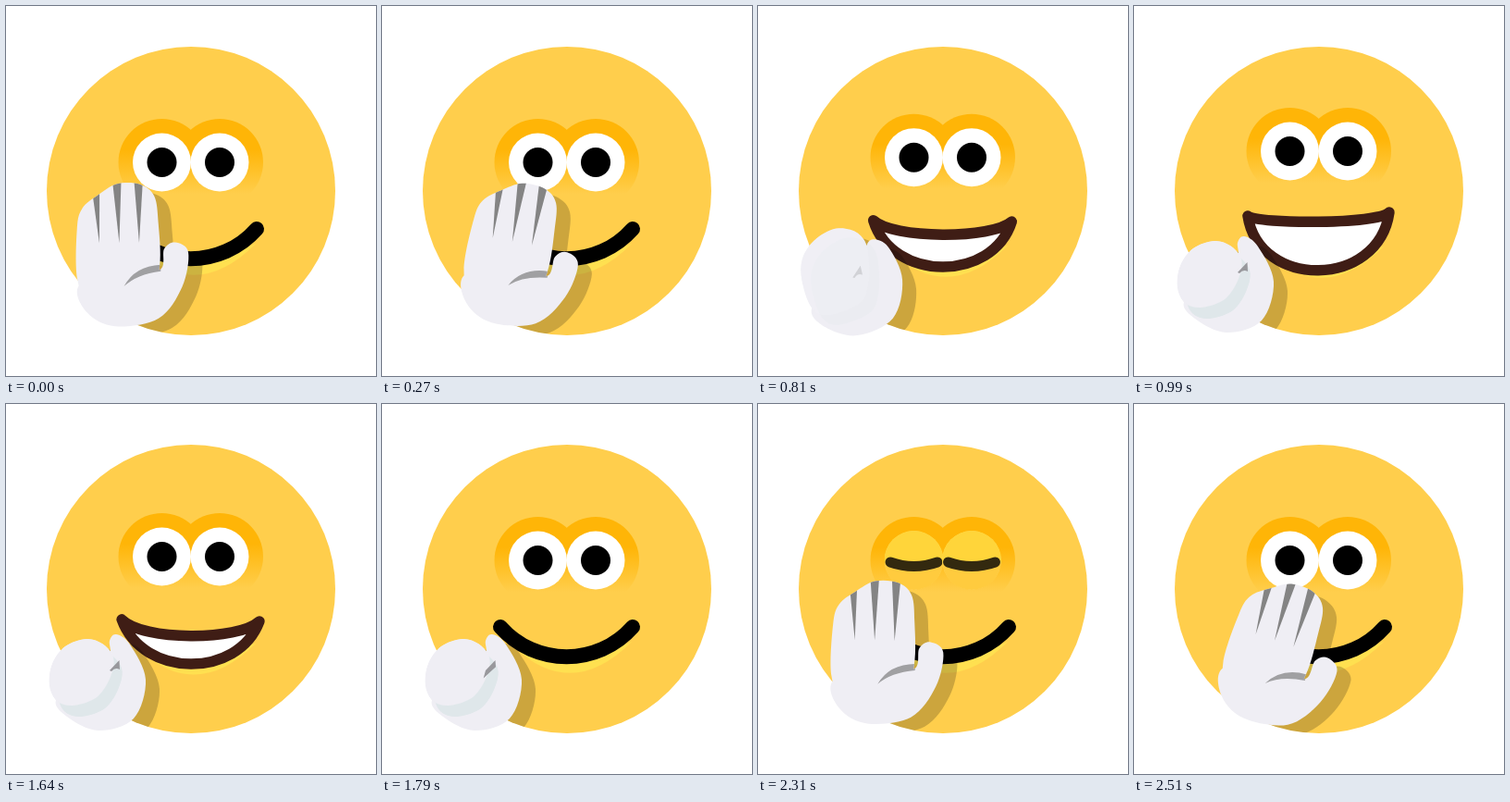
Recreate the animation shown at these times as an HTML page with a canvas. Size 400x400 px, loop 2560 ms.

```html
<!DOCTYPE html>
<html lang="en">
<head>
<meta charset="utf-8">
<title>Waving smiley</title>
<style>
html, body { margin: 0; width: 100%; height: 100%; overflow: hidden; background: #fff; }
canvas { display: block; width: 400px; height: 400px; }
</style>
</head>
<body>
<canvas id="stage" width="400" height="400"></canvas>
<script>
const g = document.getElementById('stage').getContext('2d');
const LOOP = 2560, FACE = '#ffce4c', SKIN = '#efeef4';

// Key points of the hand, joined by smooth closed curves
const FINGERS = {
  open: [[78,240], [84,218], [101,204], [122,192], [147,193], [162,206], [166,235], [167,280], [155,312], [95,320], [78,296]],
  fist: [[47,304], [50,281], [64,262], [87,254], [104,259], [115,271], [116,285], [108,305], [95,319], [72,326], [55,321]]
};
const PALM = {
  open: [[166,286], [172,263], [184,256], [198,267], [191,304], [165,338], [118,346], [88,331], [79,302], [120,280]],
  fist: [[112,272], [112,256], [119,249], [134,260], [151,298], [138,340], [100,353], [66,338], [55,318], [95,290]]
};

const mix = (a, b, p) => a + (b - a) * p;
const ease = (t, from, to) => {
  const p = Math.min(1, Math.max(0, (t - from) / (to - from)));
  return p * p * (3 - 2 * p);
};

// The motion is shown in steps of 90 or 50 ms
function step(t) {
  const snap = (start, size) => start + Math.floor((t - start) / size) * size;
  if (t < 1640) return Math.min(990, snap(0, 90));
  if (t < 1990) return snap(1640, 50);
  if (t < 2260) return snap(1990, 90);
  return snap(2260, 50);
}

function disc(x, y, r, fill) {
  g.beginPath();
  g.arc(x, y, r, 0, 7);
  g.fillStyle = fill;
  g.fill();
}

function shape(path, fill) {
  g.fillStyle = fill;
  g.fill(typeof path === 'string' ? new Path2D(path) : path);
}

// Closed Catmull-Rom curve between the two poses
function outline({ open, fist }, fold) {
  const n = open.length, path = new Path2D();
  const at = (i, k) => mix(open[(i + n) % n][k], fist[(i + n) % n][k], fold);
  const handle = (i, side, k) => at(i, k) + side * (at(i + 1, k) - at(i - 1, k)) / 6;
  path.moveTo(at(0, 0), at(0, 1));
  for (let i = 0; i < n; i++) {
    path.bezierCurveTo(handle(i, 1, 0), handle(i, 1, 1),
      handle(i + 1, -1, 0), handle(i + 1, -1, 1), at(i + 1, 0), at(i + 1, 1));
  }
  return path;
}

function drawEyes(y, shut) {
  const xs = [168.5, 231];
  const glow = g.createLinearGradient(0, y - 14, 0, y + 34);
  glow.addColorStop(0, '#ffb507');
  glow.addColorStop(1, FACE);
  for (const x of xs) disc(x, y, 47, glow);
  for (const x of xs) {
    g.save();
    g.translate(x, y);
    disc(0, 0, 31.5, '#fff');
    disc(0, 0, 16, '#000');
    const lid = mix(-32, 2, shut);
    g.save();
    g.clip(new Path2D('M-32 0 A32 32 0 0 1 32 0 A32 32 0 0 1 -32 0'));
    g.fillStyle = '#ffd53a';
    g.fillRect(-32, -32, 64, lid + 32);
    g.fillStyle = '#ffcb3e';
    g.fillRect(-32, mix(32, 2, shut), 64, 30 * shut);
    g.restore();
    if (shut > 0.5) {
      g.strokeStyle = '#33290f';
      g.lineWidth = 11;
      g.stroke(new Path2D(`M-25.5 ${lid} Q0 ${lid + 9} 25.5 ${lid}`));
    }
    g.restore();
  }
}

// A smile at joy 0, wide open at joy 1
function drawMouth(joy) {
  const dark = Math.min(1, 2 * joy), drop = 3 * joy;
  const left = [mix(128, 123, joy), mix(241, 227, joy)];
  const right = [mix(271, 276, joy), mix(241, 223, joy * joy)];
  const inset = mix(38, 12, joy);
  const curve = (a, b, y) => {
    const side = Math.sign(b[0] - a[0]) * inset;
    return `C${a[0] + side} ${y} ${b[0] - side} ${y} ${b}`;
  };
  const upper = curve(left, right, mix(284, 236, joy));
  const lower = curve(right, left, mix(284, 306, joy));

  shape(`M142 ${262 + drop} Q205 ${322 + drop} 270 ${257 + drop} Q208 285 142 ${262 + drop}`, '#ffe050');
  const path = new Path2D(`M${left} ${upper} ${lower}Z`);
  if (joy > 0) shape(path, '#fff');
  g.strokeStyle = `rgb(${63 * dark},${29 * dark},${21 * dark})`;
  g.lineWidth = mix(16, 11.5, dark);
  g.stroke(path);
}

function drawHand(fold, angle, crack) {
  const fingers = outline(FINGERS, fold);
  const hand = outline(PALM, fold);
  hand.addPath(fingers);
  const turn = () => {
    g.translate(138, 346);
    g.rotate(angle * Math.PI / 180);
    g.translate(-138, -346);
  };

  g.save();
  g.clip(new Path2D('M44 200 A156 156 0 0 1 356 200 A156 156 0 0 1 44 200'));
  g.translate(15, 10);
  turn();
  shape(hand, 'rgba(0,0,0,.2)');
  g.restore();

  g.save();
  turn();
  shape(hand, SKIN);
  g.clip(hand);

  g.globalAlpha = Math.max(0, 2 * fold - 1);
  g.translate(9, 12);
  shape(fingers, '#dfe7ea');
  g.translate(-9, -12);
  shape(fingers, SKIN);
  shape(`M122.5 277 L112 288 L${mix(114, 103, crack)} ${mix(289, 308, crack)}
    Q118 ${mix(284, 296, crack)} 123 ${mix(287, 280, crack)}Z`, '#98989c');

  g.globalAlpha = Math.max(0, 1 - 2 * fold);
  for (let i = 0; i < 3; i++) {
    const x = 98 + 23.5 * i;
    shape(`M${x - 5} 185 H${x + 5} L${102 + 21.5 * i} 256Z`, '#848484');
  }
  shape('M128 303 Q140 281 168 280 V287 Q142 290 128 303', '#a0a0a2');
  g.restore();
}

function draw(now) {
  const t = step(now % LOOP);
  const early = t < 1640;
  const joy = early ? ease(t, 590, 950) : 1 - ease(t, 1510, 1800);
  const fold = early ? ease(t, 590, 950) : 1 - ease(t, 2130, 2300);
  const shut = Math.min(ease(t, 2170, 2300), 1 - ease(t, 2330, 2430));
  // The wave runs across the loop seam and stops as the hand closes
  const wave = early ? Math.min(t + 252, 880) : Math.max(0, t - 2308);
  const angle = (0.9 + 31 * Math.sin(wave / 496 * 2 * Math.PI)) * (1 - fold);

  g.clearRect(0, 0, 400, 400);
  g.lineCap = g.lineJoin = 'round';
  disc(200, 200, 156, FACE);
  drawEyes(169 - 12 * joy * joy, shut);
  drawMouth(joy);
  drawHand(fold, angle, ease(t, 1640, 1990));
}

const start = performance.now();
function frame() {
  draw(performance.now() - start);
  requestAnimationFrame(frame);
}
frame();
</script>
</body>
</html>
```
